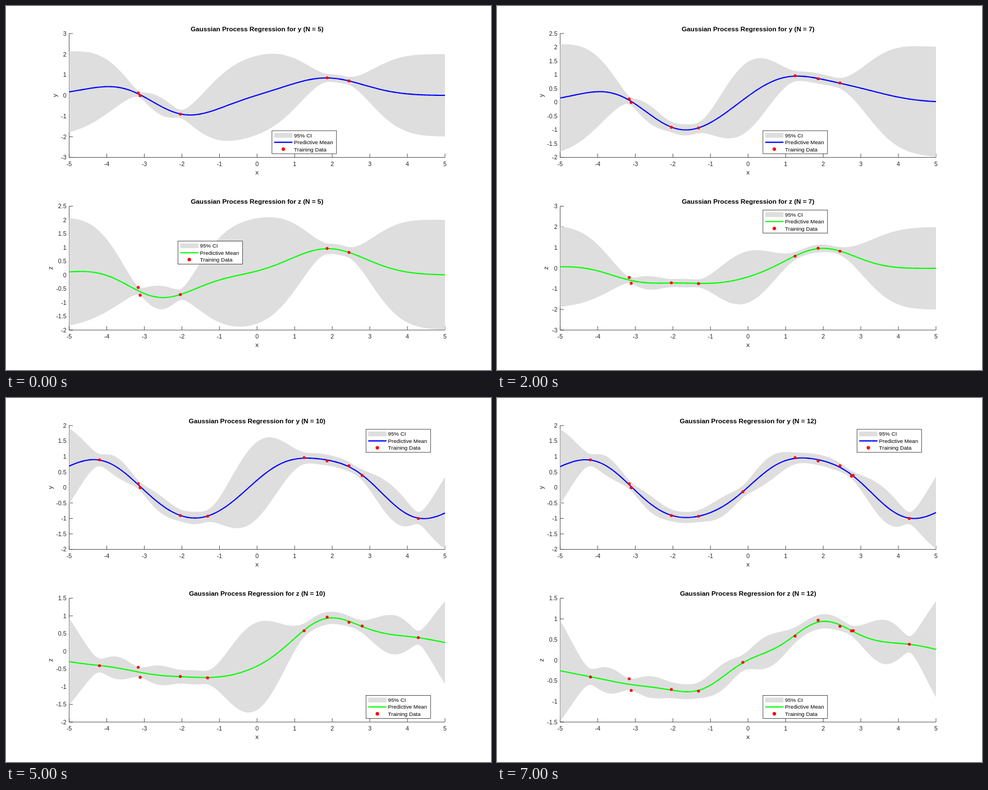
Write an HTML page that moves like this. It is 864 px wide and 648 px high and loops after 8 s.

```html
<!DOCTYPE html>
<html lang="en">
<head>
<meta charset="utf-8">
<title>Gaussian Process Regression</title>
<style>
  html, body { margin: 0; width: 100%; height: 100%; overflow: hidden; background: #fff; }
  svg { display: block; width: 864px; height: 648px; font-family: Helvetica, "Liberation Sans", Arial, sans-serif; }
  .axis { fill: none; stroke: #262626; stroke-width: .8; }
  .tick { font-size: 10.67px; fill: #262626; }
  .label { font-size: 11.73px; fill: #262626; text-anchor: middle; }
  .title { font-size: 11.73px; font-weight: bold; text-anchor: middle; }
  .key { font-size: 9.7px; }
  .band { fill: #dedede; }
  .mean { fill: none; stroke-width: 2.1; stroke-linejoin: round; }
  .dot { fill: #f00; }
</style>
</head>
<body>
<svg id="stage" viewBox="0 0 864 648"></svg>
<script>
const LEFT = 112.5, RIGHT = 782, HEIGHT = 220.5, MID = (LEFT + RIGHT) / 2;
const STEP_MS = 1000, FIRST = 5, SCENES = 8, SAMPLES = 240, NOISE = 0.01;

// Training samples [x, y, z] in order of arrival
const data = [
  [-3.163, .122, -.45], [-3.11, -.005, -.735], [-2.042, -.905, -.71],
  [1.864, .857, .966], [2.446, .703, .82], [-1.318, -.93, -.75],
  [1.251, .966, .582], [2.797, .386, .714], [-4.193, .893, -.408],
  [4.29, -1, .386], [2.752, .367, .708], [-.138, -.14, -.054]
];

// keys: legend cell (column, row) in each scene
const plots = [
  { name: 'y', col: 1, top: 49, color: '#00f', keys: '13 00 13 13 13 20 20 20'.split(' ') },
  { name: 'z', col: 2, top: 356.4, color: '#0f0', keys: '01 00 10 10 10 23 23 13'.split(' ') }
];

const kernel = (a, b) => Math.exp((a - b) * (b - a) / 2);
const dotProduct = (a, b) => a.reduce((s, v, i) => s + v * b[i], 0);
const px = x => LEFT + (x + 5) * (RIGHT - LEFT) / 10;
const pair = (x, y) => x.toFixed(2) + ' ' + y.toFixed(2);
const text = (cls, x, y, s, more = '') => `<text class="${cls}" x="${x}" y="${y}" ${more}>${s}</text>`;
const dot = (x, y, r) => `<circle class="dot" cx="${x}" cy="${y}" r="${r}"/>`;

function invert(m) {
  const n = m.length;
  const a = m.map((row, i) => [...row, ...row.map((_, j) => +(i === j))]);
  for (let i = 0; i < n; i++) {
    const p = a[i][i];
    a[i] = a[i].map(v => v / p);
    for (let r = 0; r < n; r++) {
      if (r === i) continue;
      const f = a[r][i];
      a[r] = a[r].map((v, j) => v - f * a[i][j]);
    }
  }
  return a.map(row => row.slice(n));
}

// Posterior mean with its two-sigma bounds along x
function regress(xs, ys) {
  const inv = invert(xs.map((a, i) => xs.map((b, j) => kernel(a, b) + (i === j ? NOISE : 0))));
  const weights = inv.map(row => dotProduct(row, ys));
  return Array.from({ length: SAMPLES + 1 }, (_, i) => {
    const x = -5 + 10 * i / SAMPLES;
    const k = xs.map(v => kernel(x, v));
    const variance = 1 - dotProduct(k, inv.map(row => dotProduct(row, k)));
    const width = 2 * Math.sqrt(Math.max(0, variance));
    const mean = dotProduct(k, weights);
    return { x, mean, high: mean + width, low: mean - width };
  });
}

// Round the range outwards, with at most nine intervals of a half
function limits(curve) {
  const min = Math.min(...curve.map(p => p.low)), max = Math.max(...curve.map(p => p.high));
  const fit = step => ({ lo: Math.floor(min / step) * step, hi: Math.ceil(max / step) * step, step });
  const fine = fit(.5);
  return fine.hi - fine.lo > 4.5 ? fit(1) : fine;
}

function axes(plot, { lo, hi, step }, py) {
  const bottom = plot.top + HEIGHT;
  let path = `M${LEFT} ${plot.top}V${bottom}H${RIGHT}`, labels = '';
  for (let x = -5; x <= 5; x++) {
    path += `M${pair(px(x), bottom)}v-6.7`;
    labels += text('tick', px(x), bottom + 15.4, x, 'text-anchor="middle"');
  }
  for (let v = lo; v <= hi; v += step) {
    path += `M${pair(LEFT, py(v))}h6.7`;
    labels += text('tick', 107.6, py(v) + 3.9, v, 'text-anchor="end"');
  }
  const lx = step === 1 ? 90.7 : 83.3, ly = plot.top + HEIGHT / 2;
  return `<path class="axis" d="${path}"/>` + labels +
    text('label', MID, bottom + 30, 'x') +
    text('label', lx, ly, plot.name, `transform="rotate(-90 ${lx} ${ly})"`);
}

function legend(plot, [col, row]) {
  const x = 306.3 + 167.5 * col, y = plot.top + 6.8 + 55.4 * row;
  return `<g transform="translate(${x} ${y})">
    <rect class="axis" width="115" height="41" style="fill:#fff"/>
    <rect class="band" x="4" y="4" width="32.5" height="8.5"/>
    <path class="mean" stroke="${plot.color}" d="M4 20.6H36.5"/>
    ${dot(20.2, 32.8, 3.1)}
    ${['95% CI', 'Predictive Mean', 'Training Data'].map((s, i) => text('key', 39.3, 11.7 + 12.4 * i, s)).join('')}
  </g>`;
}

function drawPlot(plot, scene) {
  const n = FIRST + scene;
  const points = data.slice(0, n);
  const curve = regress(points.map(p => p[0]), points.map(p => p[plot.col]));
  const range = limits(curve);
  const py = v => plot.top + (range.hi - v) / (range.hi - range.lo) * HEIGHT;
  const trace = key => curve.map(p => pair(px(p.x), py(p[key])));
  const outline = trace('high').concat(trace('low').reverse());
  return axes(plot, range, py) +
    text('title', MID, plot.top - 4.5, `Gaussian Process Regression for ${plot.name} (N = ${n})`) +
    `<path class="band" d="M${outline.join('L')}Z"/>` +
    `<path class="mean" stroke="${plot.color}" d="M${trace('mean').join('L')}"/>` +
    points.map(p => dot(px(p[0]), py(p[plot.col]), 2.6)).join('') +
    legend(plot, plot.keys[scene]);
}

const stage = document.getElementById('stage');
const scenes = Array.from({ length: SCENES }, (_, i) => plots.map(p => drawPlot(p, i)).join(''));
let start = null, shown = -1;

function render(ms) {
  const i = Math.floor(ms / STEP_MS) % SCENES;
  if (i !== shown) stage.innerHTML = scenes[shown = i];
}

function tick(now) {
  if (start === null) start = now;
  render(now - start);
  requestAnimationFrame(tick);
}

render(0);
requestAnimationFrame(tick);
</script>
</body>
</html>
```
